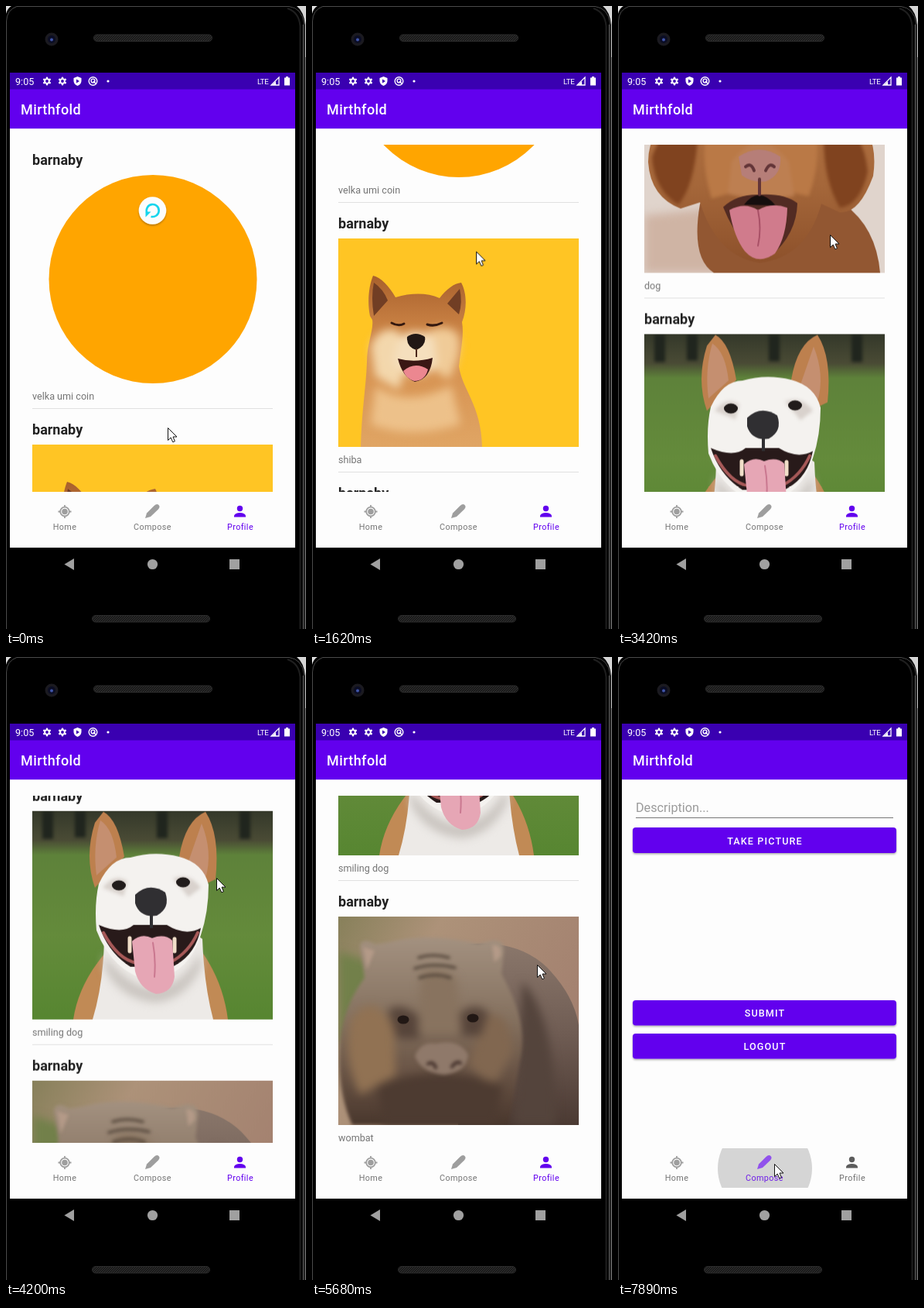
An HTML page that plays this animation: 388x804 px, repeating every 8000 ms.

```html
<!DOCTYPE html>
<html lang="en">
<head>
<meta charset="utf-8">
<title>Photo feed</title>
<style>
html, body { margin: 0; width: 100%; height: 100%; overflow: hidden; background: #000; }
#stage { display: block; width: 388px; height: 804px; font-family: Roboto, sans-serif; }
.name { font-weight: 700; font-size: 18px; fill: #212121; }
.note { font-size: 12.6px; fill: #757575; }
.tab { font-size: 10.8px; letter-spacing: .4px; text-anchor: middle; }
.btn { font-size: 12.6px; font-weight: 500; letter-spacing: 1.12px; text-anchor: middle; fill: #fff; }
.soft { filter: blur(6px); }
.fuzz { filter: blur(2px); }
.line { fill: none; stroke-linecap: round; stroke-linejoin: round; }

#list, #cursor, #spinner, #feed, #form, #ripple, #compose, #profile { animation: 8s linear infinite; }
#list { animation-name: scroll; }
#cursor { animation-name: point; }
#spinner { animation-name: shrink; transform-origin: 189.5px 264px; }
#feed { animation-name: leave; animation-timing-function: step-end; }
#form { animation-name: enter; animation-timing-function: step-end; }
#ripple { animation-name: ripple; transform-origin: 190px 660px; }
#compose { animation-name: activate; }
#profile { animation-name: deactivate; }

@keyframes scroll {
  0%, 6.25% { transform: translateY(0); animation-timing-function: ease-in-out; }
  18.5% { transform: translateY(-260px); animation-timing-function: ease-out; }
  20.25% { transform: translateY(-266px); }
  24% { transform: translateY(-266px); animation-timing-function: ease-in; }
  30.5% { transform: translateY(-505px); animation-timing-function: ease-out; }
  35.625% { transform: translateY(-554px); }
  37% { transform: translateY(-562px); }
  43% { transform: translateY(-850px); animation-timing-function: ease-out; }
  52.5% { transform: translateY(-1063px); animation-timing-function: ease-out; }
  59.25%, 62.75% { transform: translateY(-1160px); }
  64.625% { transform: translateY(-1225px); animation-timing-function: ease-out; }
  71%, 78.4% { transform: translateY(-1275px); animation-timing-function: ease-out; }
  81.75%, 100% { transform: translateY(-1298px); }
}
@keyframes point {
  0%, 6.25% { transform: translate(209px, 544px); animation-timing-function: ease-in-out; }
  18.5%, 20.25% { transform: translate(212px, 316px); }
  24% { transform: translate(255px, 500px); animation-timing-function: ease-in; }
  30.5% { transform: translate(275px, 285px); animation-timing-function: ease-in-out; }
  35.625%, 36.5% { transform: translate(327px, 560px); }
  43%, 52.5% { transform: translate(272px, 285px); animation-timing-function: ease-in-out; }
  59.25%, 62.75% { transform: translate(294px, 498px); }
  64.625% { transform: translate(293px, 433px); animation-timing-function: ease-out; }
  71%, 78.4% { transform: translate(291px, 397px); }
  81.75%, 88% { transform: translate(290px, 375px); animation-timing-function: ease-in-out; }
  95.5%, 100% { transform: translate(202px, 654px); }
}
@keyframes shrink {
  0%, 1.5% { transform: scale(1); }
  5%, 100% { transform: scale(0); }
}
@keyframes leave { 0% { opacity: 1; } 96.8%, 100% { opacity: 0; } }
@keyframes enter { 0% { opacity: 0; } 96.8%, 100% { opacity: 1; } }
@keyframes ripple {
  0%, 96% { transform: scale(.25); opacity: 0; }
  96.01% { transform: scale(.25); opacity: 1; }
  98.6%, 100% { transform: scale(1); opacity: 1; }
}
@keyframes activate {
  0%, 96.8% { color: #9e9e9e; fill: #757575; }
  98.6%, 100% { color: #9152ec; fill: #6f1ce8; }
}
@keyframes deactivate {
  0%, 96.8% { color: #6200ee; fill: #6200ee; }
  98.6%, 100% { color: #5c5c5c; fill: #707070; }
}
</style>
</head>
<body>
<svg id="stage" viewBox="0 0 388 804">
  <defs>
    <clipPath id="window"><rect x="5" y="179" width="369" height="448"/></clipPath>
    <clipPath id="tabArea"><rect x="128" y="634" width="124" height="51"/></clipPath>
    <pattern id="mesh" width="3" height="3" patternUnits="userSpaceOnUse">
      <rect width="3" height="3" fill="#181818"/><path d="M0 3L3 0" stroke="#333"/>
    </pattern>
    <filter id="shade" x="-30%" y="-30%" width="160%" height="170%">
      <feDropShadow dx="0" dy="1.5" stdDeviation="1.2" flood-opacity=".32"/>
    </filter>
    <linearGradient id="shibaFur" x2="0" y2="1">
      <stop stop-color="#a8602c"/><stop offset=".4" stop-color="#d48d4c"/><stop offset="1" stop-color="#e0a564"/>
    </linearGradient>
    <linearGradient id="tanFur" x2="0" y2="1">
      <stop stop-color="#b67543"/><stop offset=".6" stop-color="#a5673a"/><stop offset="1" stop-color="#8d512b"/>
    </linearGradient>
    <linearGradient id="lawn" x2="0" y2="1">
      <stop stop-color="#34382a"/><stop offset=".14" stop-color="#4a4b35"/><stop offset=".21" stop-color="#5e823a"/>
      <stop offset=".6" stop-color="#648b3b"/><stop offset="1" stop-color="#578631"/>
    </linearGradient>
    <linearGradient id="dust" x2="1" y2=".5">
      <stop stop-color="#87805a"/><stop offset=".35" stop-color="#ad9279"/><stop offset="1" stop-color="#a3806f"/>
    </linearGradient>
    <linearGradient id="wombatFur" x2="0" y2="1">
      <stop stop-color="#a39180"/><stop offset=".45" stop-color="#84705e"/><stop offset=".75" stop-color="#665143"/><stop offset="1" stop-color="#49372d"/>
    </linearGradient>
    <linearGradient id="wombatBack" x2="0" y2="1">
      <stop stop-color="#8a776b"/><stop offset=".5" stop-color="#6f5c53"/><stop offset="1" stop-color="#4b3a33"/>
    </linearGradient>
    <g id="head">
      <text class="name" x="34" y="205">barnaby</text>
      <path d="M34 519.5H345" stroke="#e0e0e0"/>
    </g>
    <path id="gear" d="M0-4.2V4.2M-3.7-2.1L3.7 2.1M-3.7 2.1L3.7-2.1" stroke="#fff" stroke-width="2.6" stroke-linecap="round"/>
  </defs>

  <!-- device -->
  <rect width="388" height="804"/>
  <path d="M0 0H7Q2 3 0 10Z" fill="#ddd"/>
  <path d="M.5 804V20Q1 5 14 .5H366Q383 3 385.500 22V804" fill="none" stroke="#4a4a4a"/>
  <path d="M376 0H388V66H387V24Q385 7 376 0Z" fill="#d5d5d5"/>
  <path d="M387.500 66V804" stroke="#8a8a8a"/>
  <path d="M364 3Q379 8 380.500 26V804" fill="none" stroke="#1f1f1f" stroke-width="2"/>
  <path d="M384.500 24V804" stroke="#3c3c3c" stroke-width="2"/>
  <circle cx="59" cy="43" r="8.500" fill="#1b1a20"/>
  <circle cx="59" cy="43" r="5" fill="#0b0d24"/>
  <circle cx="59" cy="43.500" r="2" fill="#4055a8"/>
  <rect x="113.500" y="37" width="153" height="8.500" rx="4.200" fill="url(#mesh)" stroke="#2d2d2d"/>
  <rect x="111.500" y="786.500" width="152" height="8.500" rx="4.200" fill="url(#mesh)" stroke="#2d2d2d"/>

  <!-- app bar -->
  <rect x="5" y="86" width="369" height="613" fill="#fdfdfd"/>
  <rect x="5" y="86" width="369" height="22" fill="#3a00b1"/>
  <rect x="5" y="107.500" width="369" height="50.700" fill="#6200ee"/>
  <text x="12" y="102" font-size="12.6" fill="#fff">9:05</text>
  <g fill="#fff">
    <use href="#gear" x="53" y="97"/><circle cx="53" cy="97" r="3.800"/><circle cx="53" cy="97" r="1.900" fill="#3a00b1"/>
    <use href="#gear" x="73" y="97"/><circle cx="73" cy="97" r="3.800"/><circle cx="73" cy="97" r="1.900" fill="#3a00b1"/>
    <path d="M92.500 91L97.500 93V97Q97 101.500 92.500 103Q88 101.500 87.500 97V93Z"/>
    <path d="M91 94.500L95 97L91 99.500Z" fill="#3a00b1"/>
    <g fill="none" stroke="#fff" stroke-width="1.400">
      <circle cx="112.500" cy="97" r="5.300"/><circle cx="112.500" cy="96.500" r="2.400"/><path d="M113 97L116 100"/>
    </g>
    <circle cx="132" cy="97" r="1.600"/>
    <text x="325" y="100.500" font-size="9.800" letter-spacing="-.3">LTE</text>
    <path d="M353 92V102H343Z" fill="none" stroke="#fff" stroke-width="1.300"/><path d="M349 97V102H344Z"/>
    <path d="M360 92.500H362V91H365V92.500H367V102.500H360Z"/>
    <text x="19" y="140" font-size="18" font-weight="500" letter-spacing=".4">Mirthfold</text>
  </g>

  <!-- feed -->
  <g id="feed">
    <g clip-path="url(#window)">
      <g id="list">
        <g>
          <use href="#head"/>
          <circle cx="190" cy="352.500" r="134.500" fill="#ffa500"/>
          <text class="note" x="34" y="508">velka umi coin</text>
        </g>

        <g transform="translate(0 348)">
          <use href="#head"/>
          <svg x="34" y="218" width="311" height="269">
            <rect width="311" height="269" fill="#ffc524"/>
            <path d="M29 269C30 225 36 190 37 160C37 135 46 118 44 105L41 100C37 80 40 60 45 48C55 50 66 62 74 76C95 70 115 70 131 77C140 65 150 58 159 57C166 70 167 90 160 108C163 125 158 145 156 165C160 195 185 215 186 269Z" fill="url(#shibaFur)"/>
            <path d="M46 57Q58 65 64 80L46 100Q42 75 46 57ZM157 65Q161 82 156 98L141 84Z" fill="#713e24"/>
            <g class="soft">
              <path d="M42 140Q50 114 76 118L92 152L78 195L48 178Z" fill="#f3d7ac"/>
              <path d="M112 122Q140 107 155 124Q162 150 142 182L112 160Z" fill="#f0cb98"/>
              <path d="M78 128Q100 112 124 129L128 165Q98 190 70 160Z" fill="#f5dfbd"/>
              <path d="M48 190Q86 220 146 190L158 240Q93 260 42 240Z" fill="#edc18a"/>
            </g>
            <path d="M69 109Q78 114 85 110M115 111Q124 114 134 109" class="line" stroke="#35190f" stroke-width="3"/>
            <path d="M77 155Q99 161 122 154Q119 182 99 185Q83 179 77 155Z" fill="#3a1714"/>
            <path d="M84 171Q99 158 116 169Q112 184 98 184Q88 181 84 171Z" fill="#ec8790"/>
            <path d="M89 127Q100 119 112 127Q114 138 101 144Q88 140 89 127Z" fill="#211714"/>
            <path d="M101 142V153" stroke="#4a271a" stroke-width="2"/>
          </svg>
          <text class="note" x="34" y="508">shiba</text>
        </g>

        <g transform="translate(0 696)">
          <use href="#head"/>
          <svg x="34" y="218" width="311" height="269">
            <rect width="311" height="269" fill="#e0d4cc"/>
            <path d="M0 195L95 185V269H0Z" fill="#cfb4a4" class="soft"/>
            <path d="M72 180Q150 120 258 180Q300 210 305 269H90Q60 250 72 180Z" fill="#925732"/>
            <path d="M76 10L108 20Q150 -10 198 20L235 14Q250 38 268 62Q304 90 296 144Q278 193 253 191L229 180Q210 249 149 256Q94 248 72 178L47 186Q8 171 5 126Q5 81 47 65Q66 45 76 10Z" fill="url(#tanFur)"/>
            <g class="fuzz">
              <path d="M62 66Q24 76 10 120Q13 162 44 181Q64 158 69 98ZM244 65Q283 83 289 138Q280 181 253 185Q232 150 232 96Z" fill="#80431f"/>
              <path d="M92 45Q135 22 145 95L122 163L87 173Q66 106 92 45ZM211 45Q173 25 157 95L180 163L213 170Q236 105 211 45Z" fill="#ba7946"/>
              <path d="M113 125Q149 76 187 125L194 170L149 176L108 167Z" fill="#bd7f51"/>
            </g>
            <g fill="#2c1b17"><circle cx="108" cy="81" r="10"/><circle cx="198" cy="83" r="10"/></g>
            <g fill="#bbb6bc"><circle cx="105" cy="78" r="3"/><circle cx="195" cy="80" r="3"/></g>
            <path d="M102 184Q120 167 149 168Q181 166 198 179Q197 219 163 248Q126 244 102 184Z" fill="#522b23"/>
            <path d="M129 181Q148 156 170 182Z" fill="#160e0e"/>
            <path d="M110 188Q130 177 147 188Q165 177 185 185Q184 223 169 244Q147 260 130 241Q116 223 110 188Z" fill="#d07b8c"/>
            <path d="M147 188Q152 212 147 234" class="line" stroke="#a95167" stroke-width="2"/>
            <path d="M122 119Q149 101 176 119Q178 143 157 151Q139 153 126 143Z" fill="#b67e78"/>
            <path d="M131 132Q138 126 142 137M157 137Q162 126 168 132M149 148V168" class="line" stroke="#633538" stroke-width="4"/>
          </svg>
          <text class="note" x="34" y="508">dog</text>
        </g>

        <g transform="translate(0 1044)">
          <use href="#head"/>
          <svg x="34" y="218" width="311" height="269">
            <rect width="311" height="269" fill="url(#lawn)"/>
            <path d="M20 0V36M62 0V34M168 0V35M275 0V36" stroke="#20251e" stroke-width="14" class="fuzz"/>
            <path d="M53 269Q60 222 97 180L105 150H205L221 184Q247 222 253 269Z" fill="#c18a55"/>
            <path d="M78 269Q92 223 93 165Q157 120 220 165Q222 224 234 269Z" fill="#edeae7"/>
            <path d="M92 184Q122 226 157 230Q197 224 217 182L219 200Q198 244 158 247Q114 242 94 204Z" fill="#c9c4bf" class="soft"/>
            <path d="M81 99Q67 59 81 15L92 1Q111 11 119 59ZM190 59Q198 12 224 1Q243 30 237 88L216 98Z" fill="#bd804e"/>
            <path d="M88 12Q105 23 109 60L83 83Q78 46 88 12ZM219 16Q234 53 224 87L202 65Z" fill="#c58f70"/>
            <path d="M86 94Q102 60 127 60Q158 51 190 59Q221 67 228 95Q228 130 218 160Q206 205 157 220Q104 210 83 154Q80 120 86 94Z" fill="#f4f2ef"/>
            <path d="M91 99Q107 79 123 91L118 110ZM182 87Q204 79 218 99L202 111Z" fill="#d9d2cd" class="fuzz"/>
            <g fill="#211c1b"><ellipse cx="112" cy="96" rx="9" ry="6.500"/><ellipse cx="195" cy="92" rx="9" ry="6.500"/></g>
            <path d="M86 147Q116 160 131 147H174Q198 162 218 151Q211 187 181 201H127Q98 183 86 147Z" fill="#281a1a"/>
            <path d="M92 157Q111 192 135 196M214 157Q202 183 179 195" class="line" stroke="#a75958" stroke-width="4"/>
            <path d="M126 164V181M184 165V181" class="line" stroke="#f1dfc9" stroke-width="5"/>
            <path d="M129 168Q141 157 155 164Q171 158 181 167L184 214Q181 235 160 236Q139 230 133 207Z" fill="#e6a6b5"/>
            <path d="M156 170Q160 192 158 214" class="line" stroke="#ca7890" stroke-width="2"/>
            <path d="M133 108Q151 91 172 105Q179 125 161 135Q139 138 133 119Z" fill="#302f32"/>
            <path d="M154 133V151" stroke="#302f32" stroke-width="4"/>
          </svg>
          <text class="note" x="34" y="508">smiling dog</text>
        </g>

        <g transform="translate(0 1392)">
          <use href="#head"/>
          <svg x="34" y="218" width="311" height="269">
            <rect width="311" height="269" fill="url(#dust)"/>
            <path d="M0 45L48 60L30 145L0 165Z" fill="#72804a" class="soft"/>
            <path d="M165 36Q236 28 275 71Q305 104 311 140V269H155Z" fill="url(#wombatBack)"/>
            <path d="M238 84Q282 130 281 269H228Z" fill="#54443c" class="soft"/>
            <path d="M28 38Q31 26 48 36L67 33Q112 20 181 35L198 31Q216 29 214 47L211 74Q248 140 234 190L220 269H18Q-2 224 2 165Q5 118 34 79Z" fill="url(#wombatFur)" class="fuzz"/>
            <path d="M32 39L47 44L37 68ZM199 37Q212 35 210 51L202 59Z" fill="#b49a88" class="fuzz"/>
            <g class="soft">
              <path d="M17 132Q45 94 72 142L74 205L28 230Q4 181 17 132Z" fill="#917253"/>
              <path d="M190 128Q220 116 226 174L199 222L168 190Z" fill="#816750"/>
              <path d="M64 120Q83 110 103 128L106 158H76ZM156 126Q176 108 194 124L184 154H158Z" fill="#56443a"/>
              <path d="M107 72Q132 62 153 80L160 150H103Z" fill="#88735f"/>
              <path d="M50 218Q132 186 212 218L204 269H58Z" fill="#4d3b31"/>
            </g>
            <path d="M104 53Q122 47 143 53M99 67Q123 59 151 66M105 79Q126 72 145 79" class="line fuzz" stroke="#584a3e" stroke-width="3.500"/>
            <g fill="#221815"><ellipse cx="84" cy="133" rx="7.500" ry="5.500"/><ellipse cx="174" cy="131" rx="7.500" ry="5.500"/></g>
            <path d="M99 180Q107 161 126 164Q156 157 168 178Q167 200 137 204Q107 201 99 180Z" fill="#8f796a" class="fuzz"/>
            <path d="M116 190Q123 186 126 195M147 194Q152 186 158 189" class="line fuzz" stroke="#42302a" stroke-width="4"/>
          </svg>
          <text class="note" x="34" y="508">wombat</text>
        </g>
      </g>
    </g>
    <g id="spinner">
      <circle cx="189.500" cy="264" r="17.800" fill="#fcfcfc" filter="url(#shade)"/>
      <path d="M182.300 267A8 8 0 1 1 187.500 271.700" fill="none" stroke="#16d5ed" stroke-width="2.600"/>
      <path d="M180.500 265.500H187.500L180.500 272.500Z" fill="#16d5ed"/>
    </g>
  </g>

  <!-- compose form -->
  <g id="form">
    <text x="23" y="200" font-size="16.200" fill="#9b9b9b">Description...</text>
    <path d="M23 207.500H356" stroke="#777"/>
    <g fill="#6200ee" filter="url(#shade)">
      <rect x="19" y="220" width="341" height="33" rx="4"/>
      <rect x="19" y="443" width="341" height="32.500" rx="4"/>
      <rect x="19" y="486" width="341" height="32.500" rx="4"/>
    </g>
    <text class="btn" x="190" y="241.500">TAKE PICTURE</text>
    <text class="btn" x="190" y="464">SUBMIT</text>
    <text class="btn" x="190" y="507">LOGOUT</text>
  </g>

  <!-- tabs -->
  <g clip-path="url(#tabArea)"><circle id="ripple" cx="190" cy="660" r="61" fill="#d5d5d5"/></g>
  <g fill="#757575">
    <g fill="none" stroke="#9e9e9e" stroke-width="1.800">
      <circle cx="76" cy="652.500" r="5.800"/><path d="M76 644V647M76 658V661M67.500 652.500H70M82 652.500H84.500"/>
      <circle cx="76" cy="652.500" r="2.900" fill="#9e9e9e"/>
    </g>
    <text class="tab" x="76" y="676">Home</text>
  </g>
  <g id="compose">
    <path d="M180 661L182 654.500L191.500 645Q195 641.500 197.500 644Q200 646.500 196.500 650L187 659Z" fill="currentColor"/>
    <text class="tab" x="189.500" y="676">Compose</text>
  </g>
  <g id="profile">
    <g fill="currentColor"><circle cx="302.500" cy="648.500" r="3.700"/><path d="M295 659.500V657.500Q296.500 654 302.500 654Q308.500 654 310 657.500V659.500Z"/></g>
    <text class="tab" x="303" y="676">Profile</text>
  </g>

  <!-- system keys -->
  <g fill="#a0a0a0">
    <path d="M88 713V728L75.500 720.500Z"/><circle cx="189.500" cy="720.500" r="6.600"/><rect x="289" y="714" width="13" height="13"/>
  </g>

  <path id="cursor" d="M.5 .5V16.500L4.200 13L6.800 18.800L9.400 17.700L7 12H12Z" fill="#fff" stroke="#111" stroke-linejoin="round"/>
</svg>
</body>
</html>
```
